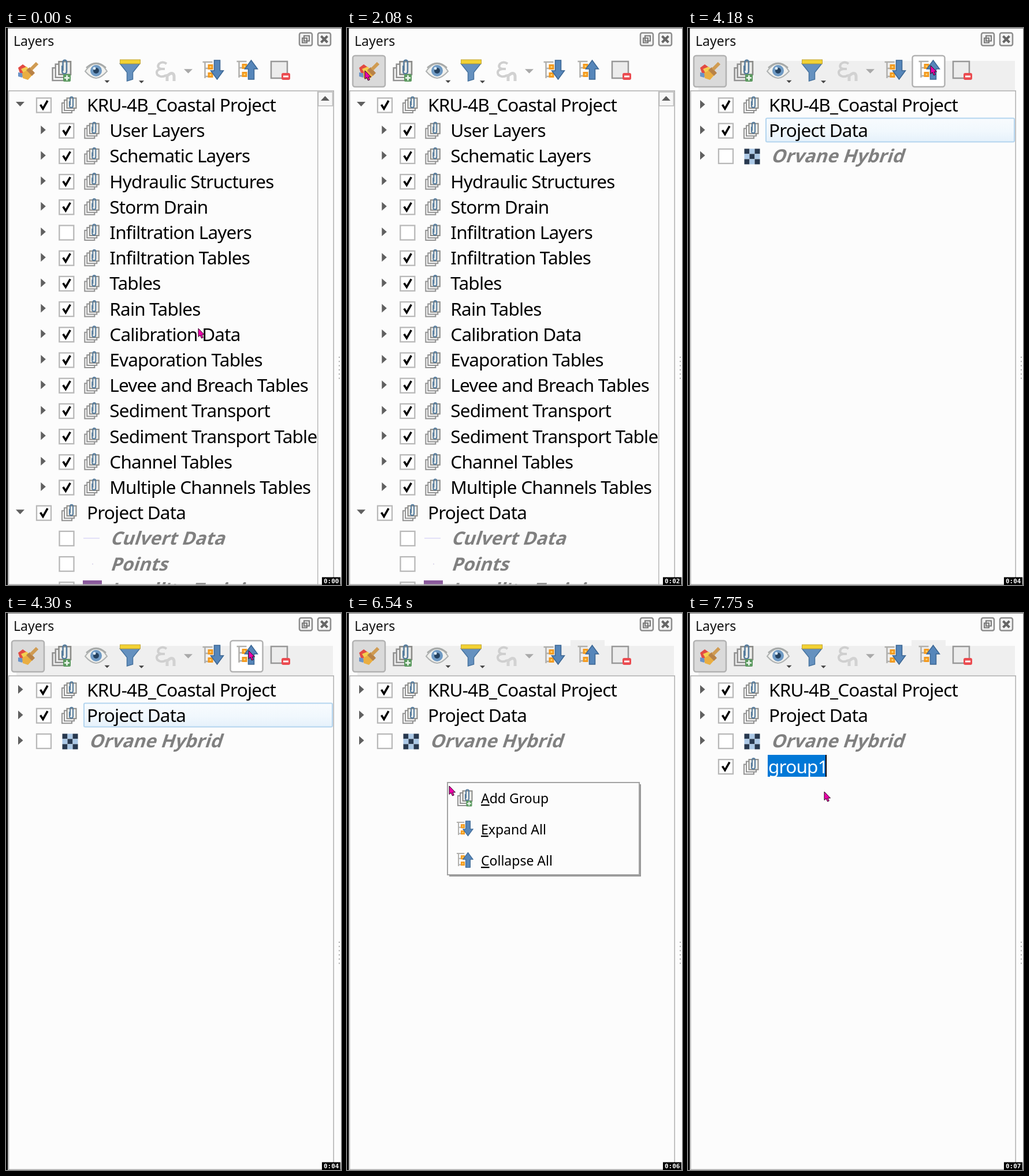
Recreate the animation shown at these times as an HTML page. Size 580x966 px, loop 8 s.

```html
<!DOCTYPE html>
<html lang="en">
<head>
<meta charset="utf-8">
<title>Layers panel</title>
<style>
html, body { margin: 0; width: 100%; height: 100%; overflow: hidden; background: #fcfcfc; }
svg { display: block; width: 100vw; height: 100vh; }
text { font: 23px "Noto Sans", "Open Sans", sans-serif; white-space: pre; }
.row { font-size: 31.5px; letter-spacing: -.8px; }
.off { font-size: 31.5px; font-weight: 700; fill: #808080; }
.clock { font: bold 11px "DejaVu Sans Mono", monospace; fill: #fff; }
.u { text-decoration: underline; text-decoration-thickness: 1.5px; text-underline-offset: 3px; }
</style>
</head>
<body>
<svg id="stage" viewBox="0 0 580 966"></svg>
<script>
const PITCH = 44.2, TOP = 134;
const rowY = i => TOP + PITCH * i;

const rect = (x, y, w, h, fill, more = '') =>
  `<rect x="${x}" y="${y}" width="${w}" height="${h}" fill="${fill}" ${more}/>`;
const path = (d, fill, stroke = 'none', width = 2) =>
  `<path d="${d}" fill="${fill}" stroke="${stroke}" stroke-width="${width}"/>`;
const at = (x, y, body, scale = 1) => `<g transform="translate(${x} ${y}) scale(${scale})">${body}</g>`;
const text = (x, y, s, cls = '', fill = '#000') => `<text x="${x}" y="${y}" class="${cls}" fill="${fill}">${s}</text>`;
const part = (id, body) => `<g id="${id}">${body}</g>`;

// Icons, drawn around their centre
const groupIcon =
  path('M-8-3h-4v17h17v-4M-4-8h-4v18h17v-4', 'none', '#929292') +
  rect(-3.5, -11.5, 16, 17.5, '#ededea', 'stroke="#8b8b88" stroke-width="2"') +
  path('M1-6V2a3 3 0 0 0 6 0V-11a2.5 2.5 0 0 0-5 0V1', 'none', '#567c9d', 2);
const plus = rect(0, 0, 13, 13, '#5c9a60', 'rx="2"') + path('M6.5 2v9M2 6.5h9', 'none', '#f2faf2', 2.5);
const addIcon = at(0, 0, groupIcon, 1.28) + at(3, 7, plus);
const arrow = dir => `<g transform="scale(1 ${dir})">` +
  path('M-5-17H5V1H11L0 16L-11 1H-5Z', '#5686ba', '#3b6693', 1.5) + '</g>';
const treeIcon = dir =>
  path('M-18-14H-1M-14-14V14M-14-3H-3M-14 11H-3', 'none', '#b0afac', 2.5) +
  [-7, 7].map(y => rect(-9, y - 3, 9, 9, '#f39a20') + rect(-6, y, 3, 3, '#ffd36b')).join('') +
  at(7, 0, arrow(dir));
const brushIcon =
  path('M-17-5L-9-11L2-3L-4 6L-14 4Z', '#e24a43') +
  path('M-12-3L-2-7L6 3L-5 9Z', '#f3ce50') +
  path('M-17 3L-7 5L-10 12L-17 10Z', '#6a93c8') +
  path('M-10 4L1-2L9 6L0 16L-9 13Z', '#e9ae42') +
  path('M-3-1L3-6L12 4L7 9Z', '#b98246') +
  path('M5-2L16-13', 'none', '#d09b52', 6);
const eyeIcon =
  path('M-19 1Q-9-13 1-12Q12-11 19 1Q8 13 0 13Q-10 12-19 1Z', '#f1f1ee', '#b0b3b3', 2) +
  '<circle r="10" fill="#6f9ac4"/><circle r="5" fill="#24415f"/><circle cx="-3" cy="-4" r="2.5" fill="#dceaf6"/>' +
  path('M-17-5Q0-21 17-5', 'none', '#a6a9a8', 2.5);
const funnelIcon =
  path('M-17-11H17L5 4V16L-5 19V4Z', '#6591bf', '#47739f', 1.5) +
  rect(-17, -18, 35, 7, '#f2d233', 'stroke="#c3a536"');
const epsilonIcon =
  path('M3-13Q-4-18-10-13Q-15-6-6-4Q-17-2-13 6Q-6 12 2 7M-6-4H0', 'none', '#cfcfcf', 4) +
  path('M4 17V5M4 8Q14-1 16 8V17', 'none', '#d2d2d2', 5);
const removeIcon = rect(-14, -15, 28, 29, '#ececec', 'stroke="#979797" stroke-width="2.5"') +
  rect(4, 5, 15, 12, '#eb4b50', 'rx="3"') + rect(7, 9.5, 9, 3, '#fff');
const drop = (x, y, s, fill) => path(`M${x - s} ${y - s / 2}h${2 * s}l${-s} ${s}Z`, fill);

const checkers = () => {
  let out = '';
  for (let i = 0; i < 9; i++)
    out += rect(-13.5 + i % 3 * 9, -13.5 + (i / 3 | 0) * 9, 9, 9, i % 2 ? '#acc9e7' : '#27384f');
  return out;
};

// Tree rows
const checkbox = (x, y, on) =>
  rect(x - 12.5, y - 12.5, 25, 25, '#fff', 'stroke="#b8b8b8" stroke-width="2.3"') +
  (on ? path(`M${x - 6} ${y - 1}l4.5 7L${x + 6.5} ${y - 8}`, 'none', '#000', 3.6) : '');
const expander = (x, y, open) => open
  ? path(`M${x - 8} ${y - 5}h15l-7.5 8Z`, '#606060')
  : path(`M${x - 4} ${y - 8}v15l8.5-7.5Z`, '#606060');
const slanted = (x, y, s) => `<g transform="translate(${x} ${y}) skewX(-18)">${text(0, 0, s, 'off')}</g>`;

function groupRow(i, label, level, { open = false, on = true, arrow = true } = {}) {
  const y = rowY(i), x = level * 39.3;
  return (arrow ? expander(25 + x, y - 1, open) : '') + checkbox(65.5 + x, y, on) +
    at(109 + x, y - 1, groupIcon) + text(140 + x, y + 11, label, 'row');
}

const PROJECT = 'KRU-4B_Coastal Project';
const layers = ['User Layers', 'Schematic Layers', 'Hydraulic Structures', 'Storm Drain', 'Infiltration Layers',
  'Infiltration Tables', 'Tables', 'Rain Tables', 'Calibration Data', 'Evaporation Tables',
  'Levee and Breach Tables', 'Sediment Transport', 'Sediment Transport Tables', 'Channel Tables',
  'Multiple Channels Tables'];
const loose = ['Culvert Data', 'Points', "Levell'to Trainin"];

const glow = (id, y, w) => part(id, rect(135, y, w, 41, 'url(#glow)', 'stroke="#b4d5ef" stroke-width="2" rx="2"'));

const expanded = part('expanded',
  glow('glowLow', 820.5, 408) +
  groupRow(0, PROJECT, 0, { open: true }) +
  layers.map((s, i) => groupRow(i + 1, s, 1, { on: s != 'Infiltration Layers' })).join('') +
  groupRow(16, 'Project Data', 0, { open: true }) +
  loose.map((s, i) => checkbox(105, rowY(17 + i)) + slanted(180, rowY(17 + i) + 11, s)).join('') +
  rect(134, rowY(17) - 1.5, 28, 2, '#e3e0f8') + rect(149, rowY(18) - 1, 2, 2, '#ddd8ec') +
  rect(133, 958, 33, 8, '#8a5a9c') +
  rect(540, 110, 27, 856, '#fcfcfc') + rect(539, 110, 1.5, 856, '#b9b9b9') +
  rect(540.5, 111, 25, 24, '#f7f7f7', 'stroke="#b9b9b9" stroke-width="1.5"') +
  path('M545 126l7.5-8 7.5 8Z', '#5c5c5c'));

const collapsed = part('collapsed',
  glow('glowHigh', 156.5, 430) +
  groupRow(0, PROJECT, 0) + groupRow(1, 'Project Data', 0) +
  expander(25, rowY(2) - 1) + checkbox(65.5, rowY(2)) + at(111, rowY(2) + .5, checkers()) +
  slanted(143, rowY(2) + 11, 'Orvane Hybrid') +
  part('newGroup', groupRow(3, '', 0, { arrow: false }) +
    rect(138, 246, 100, 38, '#0078d7') + rect(238, 246, 2, 38, '#000') +
    text(139, rowY(3) + 11, 'group1', 'row', '#fff')));

const menuItem = (y, icon, first, rest, scale, cls = '') =>
  at(204, y - 1, icon, scale) +
  `<text ${cls} x="232" y="${y + 9}"><tspan class="u">${first}</tspan>${rest}</text>`;
const menu = part('menu',
  rect(177, 297, 332, 160, '#979797') +
  rect(174, 294, 332, 160, '#fcfcfc', 'stroke="#a3a3a3" stroke-width="2"') +
  part('menuGlow', rect(174.5, 294.5, 331.5, 51.5, '#0078d7', 'stroke="#46a3ee" stroke-width="2"')) +
  menuItem(321, addIcon, 'A', 'dd Group', .78, 'id="addLabel"') +
  menuItem(375, treeIcon(1), 'E', 'xpand All', .78) +
  menuItem(429, treeIcon(-1), 'C', 'ollapse All', .78));

const button = (id, x, fill) =>
  part(id, rect(x, 48, 56, 54, fill, 'stroke="#b2b2b2" stroke-width="2.5" rx="4"'));

const titleButton = (x, body) =>
  at(x, 19.5, rect(-11, -11, 22, 22, '#f4f4f4', 'rx="3" stroke="#8d8d8d" stroke-width="2.5"') + body);

const toolbar =
  part('dimPatch', rect(66, 47, 64, 61, '#f3f3f3') + rect(31, 74, 127, 34, '#f3f3f3')) +
  part('dimBar', rect(18, 57, 548, 51, '#efefef')) +
  part('dimTab', rect(387, 47, 59, 10, '#efefef')) +
  button('hoverStyle', 10, '#fff') + button('pressStyle', 10, '#dadada') +
  button('hoverAdd', 68.5, '#fff') + button('hoverCollapse', 388.5, '#fff') +
  at(38, 74, brushIcon) + at(96, 73, addIcon) + at(156, 74, eyeIcon) + drop(175, 93, 4.5, '#444') +
  at(214.5, 73, funnelIcon) + drop(234.5, 93.5, 4.5, '#444') + at(275, 75, epsilonIcon) +
  drop(315.5, 75, 7.5, '#a9a9a9') + at(358.5, 73, treeIcon(1)) + at(417.5, 72, treeIcon(-1)) +
  at(473, 73, removeIcon);

const dots = Array.from({ length: 6 }, (_, i) => rect(576, 570 + i * 7.3, 2, 2, '#a8a8a8')).join('');

const stage = document.getElementById('stage');
stage.innerHTML =
  `<defs><linearGradient id="glow" x2="0" y2="1"><stop stop-color="#f8fbfe"/>
   <stop offset=".55" stop-color="#f1f8fd"/><stop offset="1" stop-color="#e5f1fb"/></linearGradient></defs>` +
  rect(0, 0, 580, 966, '#fcfcfc') + toolbar +
  text(13, 31, 'Layers', '', '#111') +
  titleButton(519, path('M-3-6H6V3H-3ZM-6-2H2V6H-6Z', '#eee', '#777')) +
  titleButton(551, path('M-5.5-5.5L5.5 5.5M5.5-5.5L-5.5 5.5', 'none', '#666', 4)) +
  expanded + collapsed +
  rect(4, 108.3, 564, 1.4, '#a9a9a9') + rect(4, 109, 1.2, 857, '#aaa') + rect(566.5, 109, 1.4, 857, '#aaa') +
  rect(4, 964.5, 576, 1.5, '#b0b0b0') + rect(0, 0, 580, 1, '#777') + rect(0, 0, 3.2, 966, '#000') + dots +
  menu + rect(547, 952.5, 32, 13.5, '#000') + '<text id="clock" class="clock" x="550" y="963"></text>' +
  part('cursor', path('M0 0V14.5L3.2 11.8L5.5 17L8.3 15.8L6 11H10.5Z', '#ee00aa', '#2b0922', 1));

const el = {};
stage.querySelectorAll('[id]').forEach(e => el[e.id] = e);

// Pointer holds each place until the next: time, x, y
const pointer = [
  [0, 333, 521], [370, 285, 503], [490, 224, 482], [630, 190, 410], [750, 155, 315], [860, 125, 235],
  [980, 100, 165], [1100, 84, 112], [1210, 77, 93], [1340, 59, 84], [1460, 42, 78], [1580, 31, 74],
  [2610, 146, 114], [2750, 162, 114], [2900, 195, 116], [3010, 235, 115], [3120, 275, 109],
  [3270, 327, 110], [3390, 355, 107], [3520, 378, 100], [3660, 400, 81], [3810, 420, 65],
  [4800, 405, 92], [4920, 370, 140], [5030, 330, 195], [5150, 285, 240], [5260, 255, 263],
  [5400, 210, 282], [5530, 174, 294], [5920, 170, 289], [6040, 168, 288], [6160, 175, 296],
  [6540, 177, 300], [7020, 195, 301], [7120, 215, 302], [7240, 229, 303], [7610, 236, 303], [7750, 236, 310]
];

// Visible from, until
const spans = {
  hoverAdd: [1210, 1340], hoverStyle: [1340, 1980], pressStyle: [1980, 8000],
  dimPatch: [2610, 4060], dimBar: [4060, 8000], dimTab: [4800, 8000], hoverCollapse: [3810, 4800],
  expanded: [0, 4060], collapsed: [4060, 8000], glowLow: [3010, 4060], glowHigh: [4060, 6540],
  menu: [6540, 7750], menuGlow: [6660, 7750], newGroup: [7750, 8000]
};

function draw(t) {
  for (const id in spans) {
    const [from, to] = spans[id];
    el[id].style.display = t >= from && t < to ? '' : 'none';
  }
  const [, x, y] = pointer.findLast(p => p[0] <= t);
  el.cursor.setAttribute('transform', `translate(${x} ${y})`);
  el.addLabel.setAttribute('fill', t >= 6660 ? '#fff' : '#000');
  el.clock.textContent = '0:0' + Math.floor((t + 20) / 1000) % 8;
}

const start = performance.now();
function tick() {
  draw((performance.now() - start) % 8000);
  requestAnimationFrame(tick);
}
tick();
</script>
</body>
</html>
```
